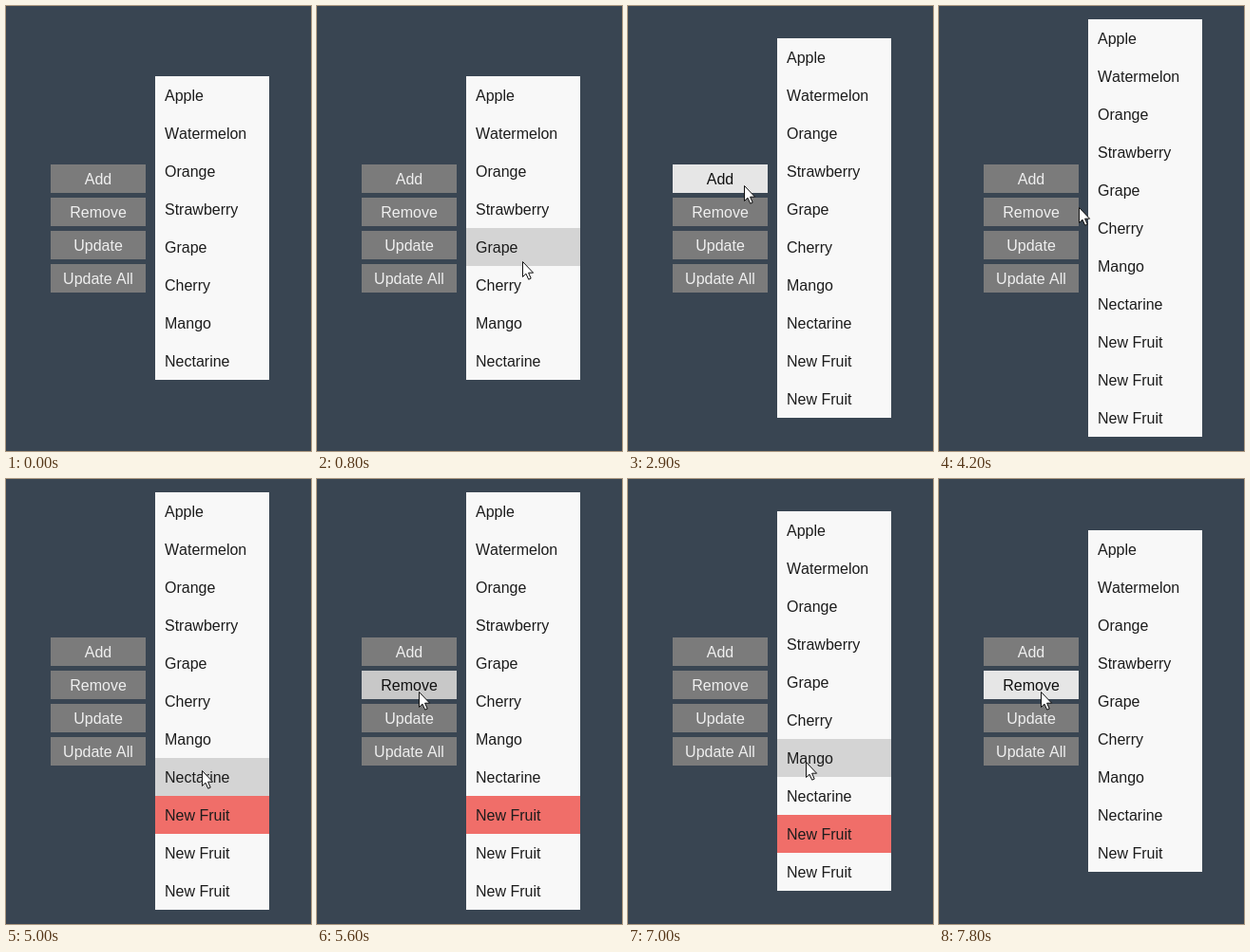
Animation, 321 px wide and 469 px high, one loop 8 s. Source, as an HTML page:

```html
<!DOCTYPE html>
<html lang="en">
<head>
<meta charset="utf-8">
<title>Fruit list</title>
<style>
  html, body { margin: 0; width: 100%; height: 100%; overflow: hidden; background: #394552; }
  body { position: relative; font: 16px "Liberation Sans", Arial, sans-serif; font-kerning: none; cursor: default; }
  #buttons { position: absolute; left: 47px; top: 167px; }
  #buttons div { width: 100px; height: 30px; margin-bottom: 5px; line-height: 32px;
    text-align: center; background: #7b7b7b; color: #efefef; }
  #buttons .hover { background: #e6e6e6; color: #111; }
  #buttons .press { background: #c8c8c8; color: #111; }
  #list { position: absolute; left: 157px; width: 120px; background: #f8f8f8; color: #1c1c1c; }
  #list div { height: 40px; line-height: 42px; padding-left: 10px; }
  #list .hover { background: #d4d4d4; }
  #list .selected { background: #f06e69; }
  #pointer { position: absolute; left: 0; top: 0; }
</style>
</head>
<body>
<div id="buttons"></div>
<div id="list"></div>
<svg id="pointer" width="13" height="20">
  <path d="M.5 .5V16.5L4 13.2L6.7 19.2L9.2 18.1L6.6 12.2H11.6Z" fill="#fff" stroke="#111"/>
</svg>
<script>
const LOOP = 8000, STEP = 100, ROW = 40, CENTER = 234, TARGET_ROW = 8;
const fruits = ["Apple", "Watermelon", "Orange", "Strawberry", "Grape", "Cherry", "Mango", "Nectarine"];

const entry = [281, 340], below = [247, 417], apple = [205, 98];
const add = [122, 189], remove = [107, 224], fruit = [203, 365];

// Each move is a quadratic curve bent towards a control point
const moves = [
  { start: 100, end: 200, from: entry, bend: [264, 378], to: below },
  { start: 300, end: 1200, from: below, bend: [210, 316], to: apple },
  { start: 1300, end: 1800, from: apple, bend: [130, 215], to: add },
  { start: 4100, end: 4500, from: add, bend: [175, 220], to: fruit },
  { start: 4800, end: 5400, from: fruit, bend: [234, 270], to: remove },
  { start: 5800, end: 6400, from: remove, bend: [196, 207], to: fruit },
  { start: 6800, end: 7400, from: fruit, bend: [190, 250], to: remove }
];
const clicks = [
  { down: 2100, up: 2200, change: 1 },
  { down: 2800, up: 2900, change: 1 },
  { down: 3500, up: 3500, change: 1 },
  { down: 5600, up: 5700, change: -1 },
  { down: 7700, up: 7800, change: -1 }
];
const selections = [4700, 6700];

const addRows = (id, labels) => labels.map(label => {
  const row = document.createElement("div");
  row.textContent = label;
  return document.getElementById(id).appendChild(row);
});
const list = document.getElementById("list");
const pointer = document.getElementById("pointer");
const buttons = addRows("buttons", ["Add", "Remove", "Update", "Update All"]);
const rows = addRows("list", [...fruits, ...Array(3).fill("New Fruit")]);

function tipAt(t) {
  const move = moves.filter(m => m.start <= t).pop();
  if (!move) return [-100, -100];
  const { start, end, from, bend, to } = move;
  const u = Math.min(1, (t - start) / (end - start)), v = 1 - u;
  return [0, 1].map(i => Math.round(v * v * from[i] + 2 * u * v * bend[i] + u * u * to[i]));
}

function draw(now) {
  const t = Math.floor(now % LOOP / STEP) * STEP;
  const [x, y] = tipAt(t);
  const done = clicks.filter(c => c.up <= t);
  const count = done.reduce((sum, c) => sum + c.change, fruits.length);
  const top = CENTER - count * ROW / 2;
  const pressed = clicks.some(c => t >= c.down && t < c.up);
  const removed = done.filter(c => c.change < 0).length;
  const selecting = selections.filter(s => s <= t).length > removed;
  const inside = (left, width, y0, height) =>
    x >= left && x < left + width && y >= y0 && y < y0 + height;

  pointer.style.transform = `translate(${x}px, ${y}px)`;
  list.style.top = top + "px";
  rows.forEach((row, i) => {
    row.hidden = i >= count;
    row.className = selecting && i === TARGET_ROW ? "selected"
      : inside(157, 120, top + i * ROW, ROW) ? "hover" : "";
  });
  buttons.forEach((button, i) => {
    button.className = !inside(47, 100, 167 + i * 35, 30) ? ""
      : pressed ? "press" : "hover";
  });
}

const start = performance.now();
function tick() {
  draw(performance.now() - start);
  requestAnimationFrame(tick);
}
tick();
</script>
</body>
</html>
```
